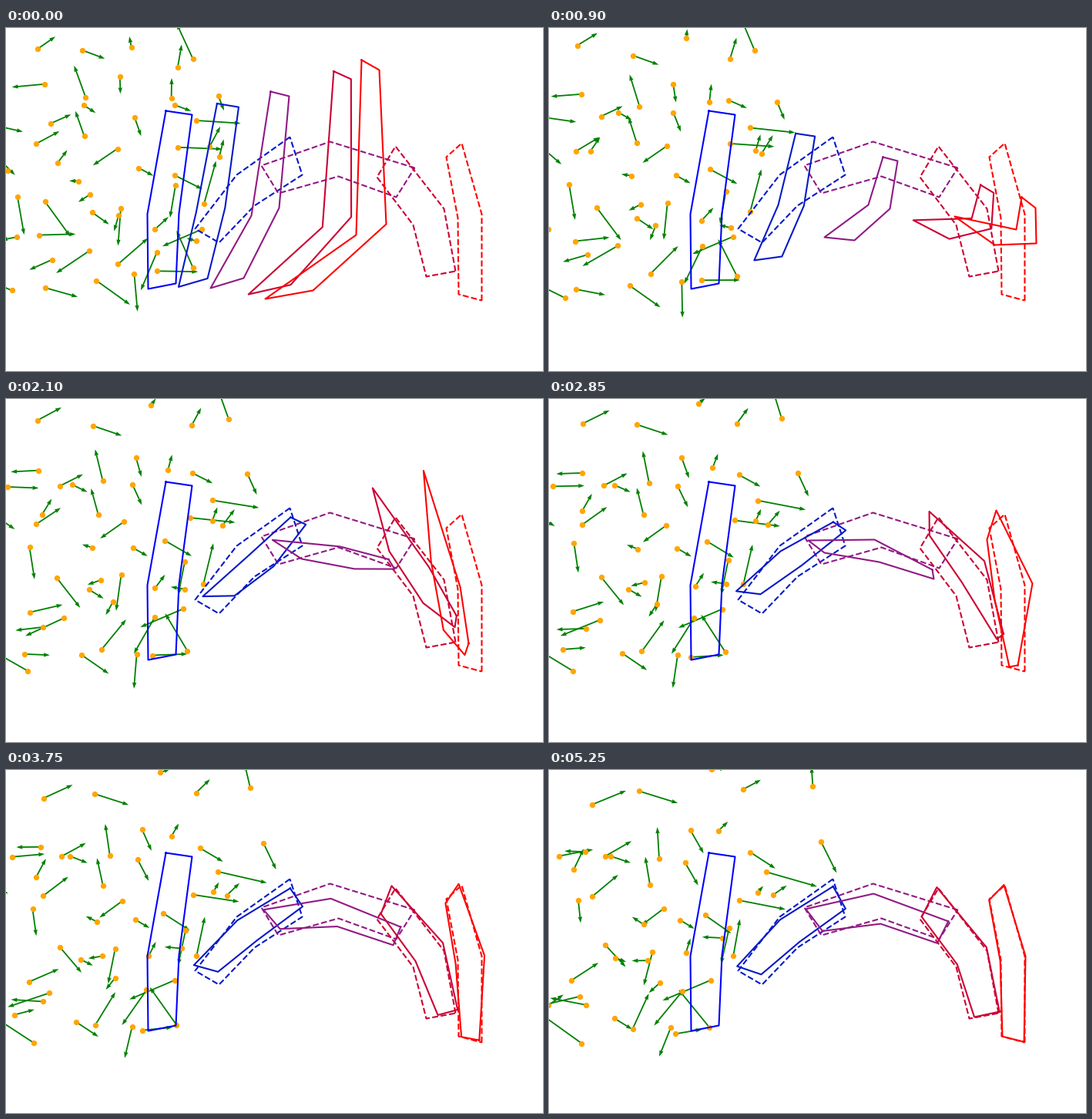
Recreate the animation shown at these times as a matplotlib script. Size 697x445 px, loop 5.4 s.

```python
import numpy as np
import matplotlib.pyplot as plt
from matplotlib.animation import FuncAnimation

W, H = 697, 445
STEP, FRAMES = 150, 36
LOOP = (FRAMES - 1) * STEP

# Outlines run down the left side and back up the right.
BASE = np.array([[207, 107], [183, 241], [184, 338],
                 [220, 331], [224, 240], [241, 112]], float)

# How far along the flow each shape sits, with its colour and goal.
STAGES = [0.25, 0.52, 0.85, 1.0]
COLORS = ["#0519c8", "#911984", "#cc0033", "#ff0000"]
GOALS = np.reshape([
    [368, 141, 299, 190, 245, 260, 276, 278, 322, 230, 384, 190],
    [530, 181, 420, 147, 331, 178, 353, 214, 431, 192, 506, 219],
    [583, 315, 568, 234, 505, 153, 481, 193, 528, 255, 545, 322],
    [617, 353, 617, 241, 591, 149, 571, 167, 586, 246, 587, 345],
], (4, 6, 2))

# Key poses of the second and last shape; the others follow from the flow.
TIMES = np.array([0.0, 900, 1500, 2850])
HALF = np.reshape([
    [343, 82, 318, 243, 265, 337, 308, 324, 354, 233, 367, 88],
    [433, 167, 414, 229, 357, 271, 396, 275, 442, 234, 452, 172],
    [480, 192, 433, 204, 352, 204, 397, 227, 459, 227, 493, 203],
    [497, 221, 422, 182, 336, 183, 357, 199, 428, 211, 499, 233],
], (4, 6, 2))
FULL = np.reshape([
    [461, 41, 454, 268, 336, 351, 398, 340, 493, 254, 484, 54],
    [613, 219, 606, 261, 526, 244, 578, 281, 632, 279, 631, 233],
    [600, 281, 578, 250, 522, 109, 551, 239, 579, 310, 603, 301],
    [608, 345, 627, 239, 580, 144, 568, 182, 578, 260, 597, 347],
], (4, 6, 2))

fig = plt.figure(figsize=(W / 100, H / 100), dpi=100, facecolor="white")
ax = fig.add_axes([0, 0, 1, 1])
ax.set_xlim(-0.5, W - 0.5)
ax.set_ylim(H - 0.5, -0.5)
ax.axis("off")


def smooth(t, keys):
    """Cubic Hermite path through keys at TIMES, held after the last."""
    t = min(t, TIMES[-1])
    slopes = np.gradient(keys, TIMES, axis=0)
    i = min(np.searchsorted(TIMES, t, side="right") - 1, len(TIMES) - 2)
    span = TIMES[i + 1] - TIMES[i]
    u = (t - TIMES[i]) / span
    return ((1 + 2 * u) * (1 - u) ** 2 * keys[i]
            + u * u * (3 - 2 * u) * keys[i + 1]
            + span * u * (1 - u) * ((1 - u) * slopes[i] - u * slopes[i + 1]))


def flow(k, half, full):
    """Quadratic path from BASE through half to full."""
    m = STAGES[1]
    return (BASE * (k - m) * (k - 1) / m
            + half * k * (k - 1) / (m * (m - 1))
            + full * k * (k - m) / (1 - m))


def settle(t):
    return 1 - np.exp(-max(t - TIMES[-1], 0) / 800)


def ring(pts):
    return np.vstack([pts, pts[:1]]).T


def outline(pts, color, style="-"):
    return ax.plot(*ring(pts), style, color=color, lw=1.5, zorder=4)[0]


outline(BASE, "#0000ff")
for goal, color in zip(GOALS, COLORS):
    outline(goal, color, "--")
shapes = [outline(BASE, color) for color in COLORS]

# Points on a loose grid, each with a random arrow.
rng = np.random.default_rng(12)
grid = np.stack(np.meshgrid(np.arange(6) * 52, 38 + np.arange(9) * 36), -1)
home = grid.reshape(-1, 2) + rng.uniform(-18, 18, (54, 2))
x, y = home.T
angle = rng.uniform(0, 2 * np.pi, len(home))
length = rng.uniform(12, 58, len(home))
aim = np.column_stack([np.cos(angle), np.sin(angle)]) * length[:, None]

# A quick first step, then a slow shear with some scatter.
kick = rng.choice([-11, 11], home.shape)
drift = np.column_stack([x * (170 - y) / 700, 0 * y])
drift += rng.normal(0, 16, home.shape)
turn = np.column_stack([25 - 0.14 * y, -5 + 0.12 * x - 0.08 * y])

arrows = ax.quiver(x, y, *aim.T, color="green", units="dots", width=1.8,
                   headwidth=3, headlength=4.5, headaxislength=4.2,
                   angles="xy", scale_units="xy", scale=1, zorder=2)
dots = ax.scatter(x, y, s=20, color="orange", linewidths=0.8, zorder=3)


def draw(i):
    t = i * STEP
    half, full = smooth(t, HALF), smooth(t, FULL)
    for line, k, goal in zip(shapes, STAGES, GOALS):
        pose = flow(k, half, full)
        pull = (0.35 + 0.6 * k) * settle(t)
        line.set_data(*ring(pose + pull * (goal - pose)))
    pos = home + kick * (1 - np.exp(-t / 500)) + drift * t / LOOP
    arrows.set_offsets(pos)
    arrows.set_UVC(*(aim + turn * t / LOOP).T)
    dots.set_offsets(pos)
    return [arrows, dots, *shapes]


anim = FuncAnimation(fig, draw, frames=FRAMES, interval=STEP,
                     repeat=True, repeat_delay=0)
plt.show()
```
